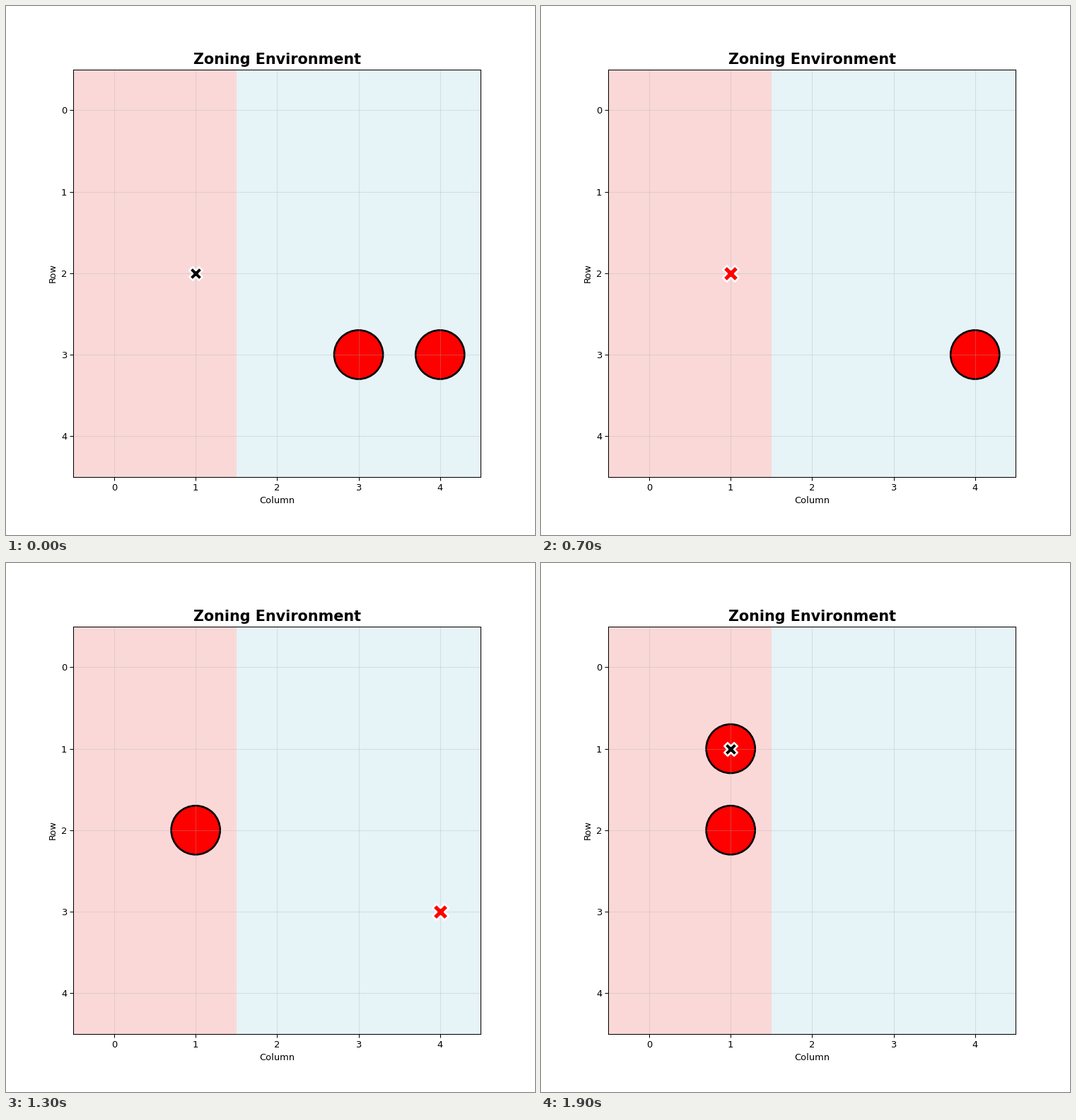
Animation of 748 by 748 pixels, one loop 2 s. Source, as a matplotlib script:

```python
import matplotlib.pyplot as plt
from matplotlib.animation import FuncAnimation
from matplotlib.patches import Circle

PLAN = "DRR*ULL*DRRR*UULLL*"  # letters move the agent, * grabs or releases
MOVES = {"U": (0, -1), "D": (0, 1), "L": (-1, 0), "R": (1, 0)}
SIZE = 5

plt.rcParams["font.family"] = "DejaVu Sans"


def simulate(steps):
    """Return agent cell, carrying flag and block cells after some steps."""
    col, row, carrying = 1, 2, False
    blocks = [(3, 3), (4, 3)]
    for action in PLAN[:steps]:
        if action == "*":
            if carrying:
                blocks.append((col, row))
            else:
                blocks.remove((col, row))
            carrying = not carrying
        else:
            dx, dy = MOVES[action]
            col, row = col + dx, row + dy
    return (col, row), carrying, blocks


fig, ax = plt.subplots(figsize=(8, 8), dpi=93.5)
ax.set_xlim(-0.5, SIZE - 0.5)
ax.set_ylim(SIZE - 0.5, -0.5)
ax.set_aspect("equal")
ax.set_xticks(range(SIZE))
ax.set_yticks(range(SIZE))
ax.grid(True, alpha=0.3)
ax.set_xlabel("Column")
ax.set_ylabel("Row")
ax.set_title("Zoning Environment", fontsize=16, fontweight="bold")

ax.axvspan(-0.5, 1.5, color="lightcoral", alpha=0.3, lw=0)
ax.axvspan(1.5, SIZE - 0.5, color="lightblue", alpha=0.3, lw=0)

discs = [
    ax.add_patch(Circle((0, 0), 0.3, facecolor="red", edgecolor="black", lw=2))
    for _ in range(2)
]
agent = ax.scatter([1], [2], s=200, marker="X", c="black",
                   edgecolors="white", linewidths=2, zorder=10)


def update(step):
    cell, carrying, blocks = simulate(step)
    for i, disc in enumerate(discs):
        disc.set_visible(i < len(blocks))
        if i < len(blocks):
            disc.center = blocks[i]
    agent.set_offsets([cell])
    agent.set_sizes([300 if carrying else 200])
    agent.set_facecolor("red" if carrying else "black")
    return [*discs, agent]


anim = FuncAnimation(fig, update, frames=len(PLAN) + 1, interval=100,
                     init_func=lambda: update(0), repeat=True,
                     repeat_delay=0, blit=False)
plt.show()
```
